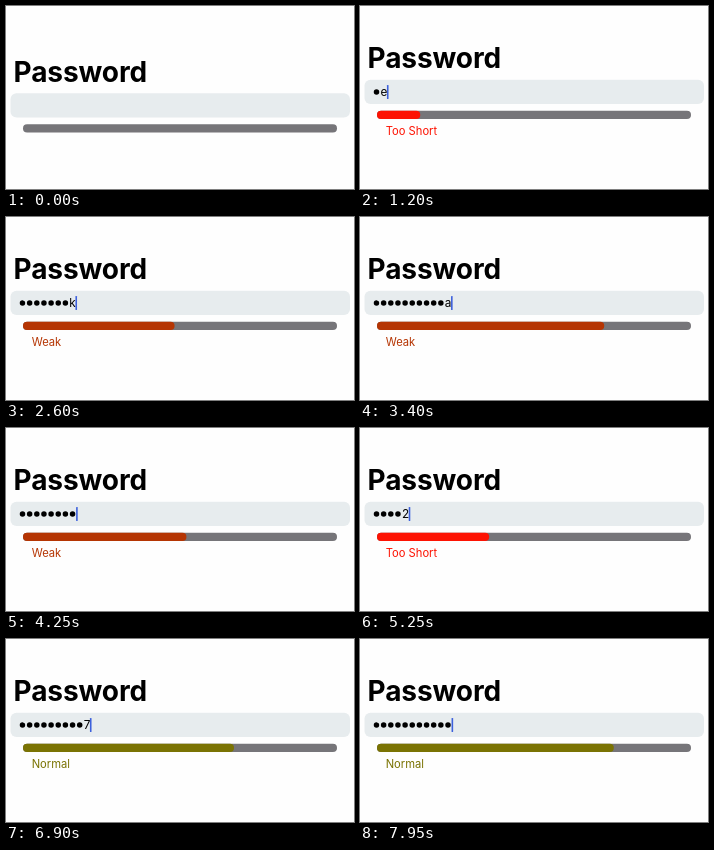
Recreate the animation shown at these times as an HTML page. Size 348 px wide and 183 px high, loop 8000 ms.

```html
<!DOCTYPE html>
<html lang="en">
<head>
<meta charset="utf-8">
<title>Password strength</title>
<style>
  html, body { margin: 0; width: 100%; height: 100%; overflow: hidden; background: #fefefe; }
  svg { display: block; width: 348px; height: 183px; font-family: Inter, "Liberation Sans", sans-serif; }
  .title { font-size: 28px; font-weight: 700; letter-spacing: -0.1px; }
  .label { font-size: 11.2px; }
  #glyph { font-size: 11.8px; }
</style>
</head>
<body>
<svg viewBox="0 0 348 183">
  <g id="form">
    <text class="title" x="7.5" y="62">Password</text>
    <rect x="4.5" y="73.7" width="339.5" height="24.3" rx="6" fill="#e7ecee"/>
    <g id="dots"></g>
    <text id="glyph" y="90.2"></text>
    <rect id="caret" y="79" width="1.6" height="14" rx="0.6" fill="#3d61dc"/>
    <rect x="17" y="104.8" width="314" height="8.2" rx="4.1" fill="#767579"/>
    <rect id="fill" x="17" y="104.8" height="8.2" rx="4.1"/>
  </g>
  <g id="labels"></g>
</svg>
<script>
const LOOP = 8000, MAX_CHARS = 15, BAR_WIDTH = 314, TEXT_X = 13.3, DOT_STEP = 7.15;
const LEVELS = [
  { text: "Too Short", color: [253, 19, 3] },
  { text: "Weak", color: [181, 53, 3] },
  { text: "Normal", color: [122, 115, 3] }
];

// Time in ms and key; "<" deletes.
const KEYS = [
  [320, "w"], [790, "e"], [1220, "a"], [1400, "k"], [1560, "w"], [1710, "e"],
  [2150, "a"], [2540, "k"], [2670, "w"], [2950, "e"], [3250, "a"],
  [3745, "<"], [3900, "<"], [4050, "<"], [4270, "<"], [4400, "<"],
  [4570, "<"], [4660, "<"], [4760, "<"],
  [4890, "1"], [5020, "2"], [5450, "3"], [5650, "4"], [5950, "5"],
  [6140, "6"], [6500, "7"], [6940, "8"], [7250, "9"], [7825, "<"]
];

const byId = id => document.getElementById(id);
const clamp = v => Math.min(1, Math.max(0, v));
const smooth = v => { v = clamp(v); return v * v * (3 - 2 * v); };

function make(parent, tag, attrs) {
  const node = document.createElementNS("http://www.w3.org/2000/svg", tag);
  for (const name in attrs) node.setAttribute(name, attrs[name]);
  return parent.appendChild(node);
}

function strength(text) {
  if (text.length < 6) return 0;
  return /\d/.test(text) ? 2 : 1;
}

// Every key becomes a state; level changes are kept for the colour fades.
let typed = "";
const states = KEYS.map(([at, key]) => {
  const step = key === "<" ? -1 : 1;
  typed = step < 0 ? typed.slice(0, -1) : typed + key;
  return { at, step, count: typed.length, glyph: step > 0 ? key : "", level: strength(typed) };
});
const changes = states.filter((s, i) => !i || s.level !== states[i - 1].level);
const start = states[0].at;

function bouncy(ms) {
  if (ms <= 0) return 0;
  const damping = 0.45, phase = ms / 500 * 2 * Math.PI;
  const root = Math.sqrt(1 - damping * damping);
  return 1 - Math.exp(-damping * phase) *
    (Math.cos(root * phase) + damping / root * Math.sin(root * phase));
}

function settle(ms) {
  const phase = Math.max(0, ms) / 500 * 2 * Math.PI;
  return 1 - (1 + phase) * Math.exp(-phase);
}

const dots = Array.from({ length: MAX_CHARS }, (_, i) =>
  make(byId("dots"), "circle", { cx: 16.5 + i * DOT_STEP, cy: 86.1, r: 2.75 }));
const labels = LEVELS.map(({ text, color }) => {
  const node = make(byId("labels"), "text", { class: "label", x: 25.7, y: 129, fill: `rgb(${color})` });
  node.textContent = text;
  return node;
});

function drawText(t) {
  const { count, glyph } = states.findLast(s => s.at <= t) || { count: 0, glyph: "" };
  const masked = count - (glyph ? 1 : 0);
  const glyphX = TEXT_X + masked * DOT_STEP;
  dots.forEach((dot, i) => dot.setAttribute("visibility", i < masked ? "visible" : "hidden"));
  const node = byId("glyph");
  node.textContent = glyph;
  node.setAttribute("x", glyphX);
  byId("caret").setAttribute("x", glyphX + (glyph ? node.getComputedTextLength() : 0) - 0.4);
  byId("caret").setAttribute("opacity", clamp((t - 60) / 130));
}

function drawMeter(t) {
  const chars = states.reduce((sum, s) => sum + s.step * bouncy(t - s.at), 0);
  const weights = [0, 0, 0];
  for (const { at, level } of changes) {
    const p = smooth((t - at) / 280);
    weights.forEach((w, i) => weights[i] = w * (1 - p) + (i === level ? p : 0));
  }
  labels.forEach((node, i) => node.setAttribute("opacity", weights[i]));
  const total = weights[0] + weights[1] + weights[2] || 1;
  const rgb = [0, 1, 2].map(c =>
    Math.round(LEVELS.reduce((sum, l, i) => sum + l.color[c] * weights[i], 0) / total));
  const fill = byId("fill");
  fill.setAttribute("width", Math.max(0, chars) / MAX_CHARS * BAR_WIDTH);
  fill.setAttribute("fill", `rgb(${rgb})`);
}

const origin = performance.now();
function draw(now) {
  const t = Math.max(0, now - origin) % LOOP;
  byId("form").setAttribute("transform", `translate(0 ${13.5 * (1 - settle(t - start))})`);
  drawText(t);
  drawMeter(t);
  requestAnimationFrame(draw);
}
draw(origin);
</script>
</body>
</html>
```
